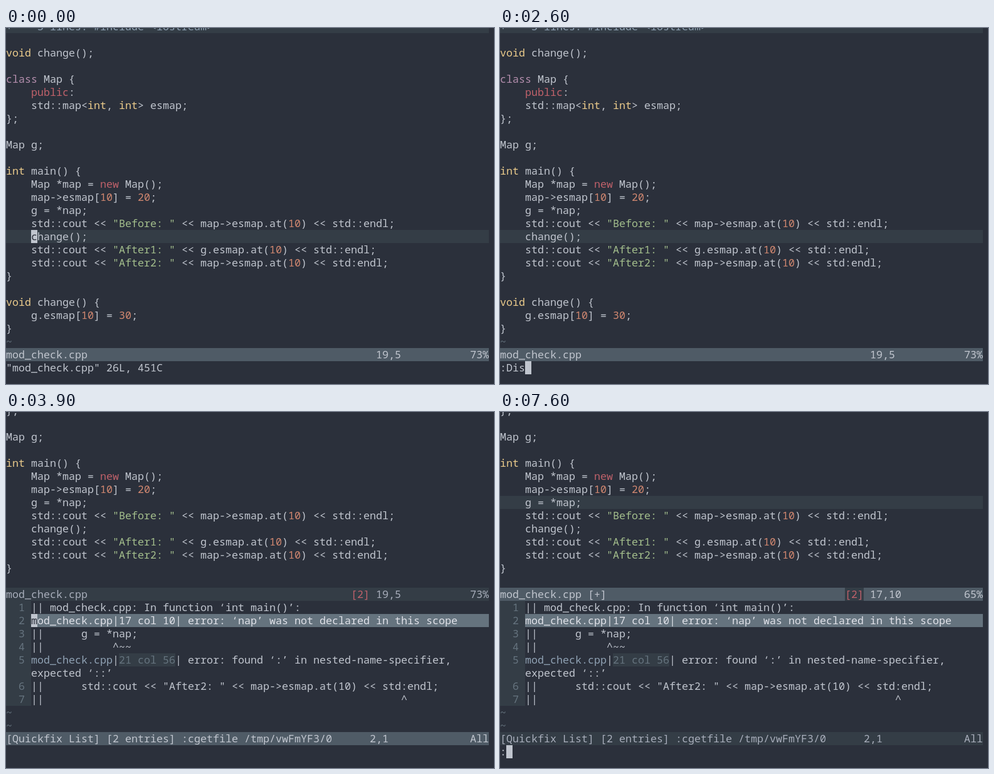
An HTML page with a canvas for the animation above (8 s loop, 856 by 624 pixels).

```html
<!DOCTYPE html>
<html lang="en">
<head>
<meta charset="utf-8">
<style>
  html, body { margin: 0; height: 100%; overflow: hidden; background: #2b303b; }
  canvas { display: block; }
</style>
</head>
<body>
<canvas width="856" height="624"></canvas>
<script>
const ctx = document.querySelector('canvas').getContext('2d');
const LOOP = 8000, CELL_W = 11, CELL_H = 23, TOP = -14, COLS = 77;
const BG = '#2b303b', FG = '#c0c5ce', LINE = '#343d46', BAR = '#4f5b66',
  DIM = '#65737e', SOFT = '#a7adba', BRIGHT = '#dfe1e8', BLUE = '#8fa1b3',
  RED = '#bf616a', ORANGE = '#d08770', YELLOW = '#ebcb8b', GREEN = '#a3be8c', PURPLE = '#b48ead';

const code = `
void change();

class Map {
    public:
    std::map<int, int> esmap;
};

Map g;

int main() {
    Map *map = new Map();
    map->esmap[10] = 20;
    g = *nap;
    std::cout << "Before: " << map->esmap.at(10) << std::endl;
    change();
    std::cout << "After1: " << g.esmap.at(10) << std::endl;
    std::cout << "After2: " << map->esmap.at(10) << std:endl;
}

void change() {
    g.esmap[10] = 30;
}`.split('\n');

const quickfix = `  1 || mod_check.cpp: In function ‘int main()’:
  2
  3 ||      g = *nap;
  4 ||           ^~~
  5              |         | error: found ‘:’ in nested-name-specifier,
    expected ‘::’
  6 ||      std::cout << "After2: " << map->esmap.at(10) << std:endl;
  7 ||                                                         ^`.split('\n');

const tokens = [
  [/"[^"]*"/g, GREEN], [/\b(int|void)\b/g, YELLOW], [/\bclass\b/g, PURPLE],
  [/\b(public|new)\b/g, RED], [/\b\d+\b/g, ORANGE]
];

function fill(row, col, cols, color) {
  ctx.fillStyle = color;
  ctx.fillRect(col * CELL_W, TOP + row * CELL_H, cols * CELL_W, CELL_H);
}

function text(row, col, str, color = FG) {
  ctx.fillStyle = color;
  [...str].forEach((ch, i) => {
    if (ch !== ' ') ctx.fillText(ch, (col + i) * CELL_W, TOP + row * CELL_H + 18);
  });
}

function codeLine(row, str) {
  const colors = Array(str.length).fill(FG);
  for (const [pattern, color] of tokens)
    for (const m of str.matchAll(pattern)) colors.fill(color, m.index, m.index + m[0].length);
  [...str].forEach((ch, i) => text(row, i, ch, colors[i]));
}

function cursor(row, col, ch = '') {
  fill(row, col, 1, FG);
  text(row, col, ch, BG);
}

function statusBar(row, active, name, rulerCol, ruler, place) {
  const color = active ? FG : SOFT;
  fill(row, 0, COLS, active ? BAR : LINE);
  text(row, 0, name, color);
  text(row, rulerCol, ruler, color);
  text(row, 74, place, color);
}

function prompt(str) {
  text(26, 0, str);
  cursor(26, str.length);
}

function drawEditor(t) {
  const moved = t >= 700 && t < 1000;
  const row = moved ? 17 : 16;
  fill(0, 0, COLS, LINE);
  text(0, 0, '+--  3 lines: #include <iostream>', BLUE);
  fill(row, 0, COLS, LINE);
  code.forEach((str, i) => codeLine(i + 1, str));
  text(24, 0, '~', DIM);
  statusBar(25, true, 'mod_check.cpp', 59, moved ? '20,5' : '19,5', moved ? '76%' : '73%');

  if (t >= 2000 && t < 3500) {
    const typed = t < 2200 ? 1 : t < 2500 ? 2 : t < 2600 ? 3 : t < 2800 ? 4 : 10;
    prompt(':Dispatch '.slice(0, typed));
  } else {
    cursor(row, 4, moved ? 's' : 'c');
    text(26, 0, t < 2000 ? '"mod_check.cpp" 26L, 451C' : 'Running: g++ mod_check.cpp');
  }
}

function drawSplit(t) {
  const inCode = t >= 5000, pending = t >= 6200 && t < 6400, fixed = t >= 6400;
  if (inCode) fill(7, 0, COLS, LINE);
  code.slice(6, 19).forEach((str, i) => codeLine(i, fixed ? str.replace('nap', 'map') : str));
  statusBar(14, inCode, 'mod_check.cpp' + (fixed ? ' [+]' : ''), 59,
    inCode ? '17,10' : '19,5', inCode ? '65%' : '73%');
  fill(14, 55, 3, LINE);
  text(14, 55, '[2]', RED);

  quickfix.forEach((str, i) => {
    fill(15 + i, 0, 4, LINE);
    text(15 + i, 0, str.slice(0, 4), DIM);
    text(15 + i, 4, str.slice(4));
  });
  fill(16, 4, COLS - 4, DIM);
  text(16, 4, 'mod_check.cpp|17 col 10| error: ‘nap’ was not declared in this scope', BRIGHT);
  text(19, 4, 'mod_check.cpp', BLUE);
  fill(19, 18, 9, LINE);
  text(19, 18, '21 col 56', DIM);
  text(23, 0, '~', DIM);
  text(24, 0, '~', DIM);
  statusBar(25, !inCode, '[Quickfix List] [2 entries] :cgetfile /tmp/vwFmYF3/0', 58, '2,1', 'All');

  if (!inCode) cursor(16, 4, 'm');
  else if (pending) {
    ctx.fillStyle = FG;
    ctx.fillRect(9 * CELL_W, TOP + 8 * CELL_H - 4, CELL_W, 4);
    text(26, 66, 'r');
  } else if (t < 7600) cursor(7, 9, fixed ? 'm' : 'n');
  else prompt(':');
}

function draw() {
  const t = performance.now() % LOOP;
  ctx.fillStyle = BG;
  ctx.fillRect(0, 0, 856, 624);
  ctx.font = '18.333px "Noto Sans Mono", "DejaVu Sans Mono", monospace';
  (t < 3800 ? drawEditor : drawSplit)(t);
  requestAnimationFrame(draw);
}
draw();
</script>
</body>
</html>
```
